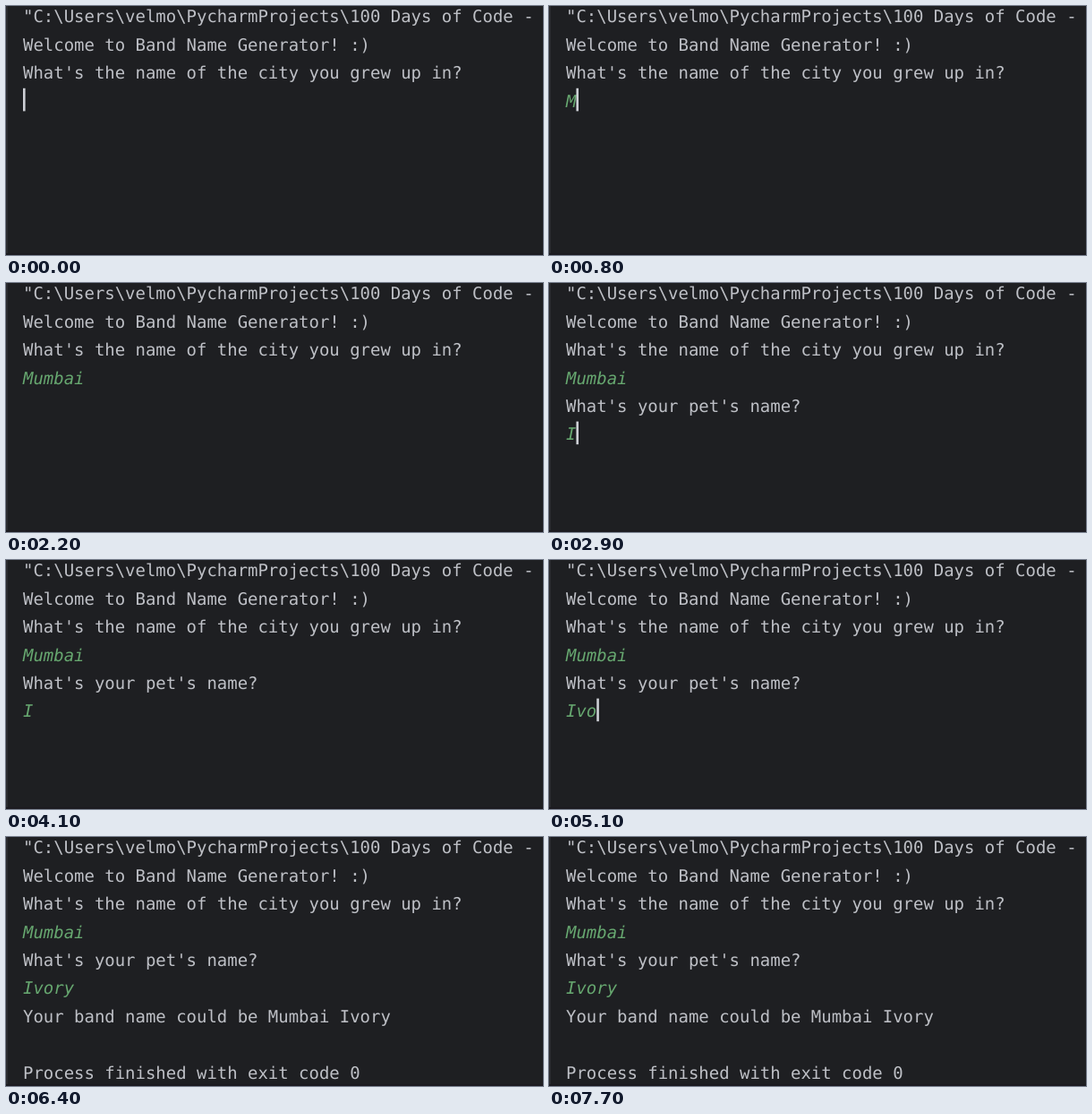
Write an HTML page that moves like this. It is 600 px wide and 278 px high and loops after 7800 ms.

```html
<!DOCTYPE html>
<html lang="en">
<head>
<meta charset="utf-8">
<title>Band name generator</title>
<style>
  html, body { margin: 0; width: 100%; height: 100%; overflow: hidden; background: #1e1f22; }
  svg { display: block; width: 600px; height: 278px; }
  text {
    font: 18.97px "DejaVu Sans Mono", "Noto Sans Mono", monospace;
    fill: #bec0c6; white-space: pre; text-rendering: geometricPrecision;
  }
  .typed { font-style: italic; fill: #67a870; }
</style>
</head>
<body>
<svg viewBox="0 0 600 278">
  <rect width="600" height="278" fill="#1e1f22"/>
  <rect width="2" height="278" fill="#2a2b2f"/>
  <rect y="276" width="600" height="2" fill="#1b1a20"/>
  <g id="lines"></g>
  <rect id="caret" width="2.6" height="25.6" fill="#ced0d6"/>
</svg>
<script>
const LOOP = 7800, LEFT = 19, ADVANCE = 11.42, FIRST = 18.4, PITCH = 31.4;
const CITY = "Mumbai", PET = "Ivory";

// Each row: text, time it is printed, or key times when typed
const rows = [
  { text: '"C:\\Users\\velmo\\PycharmProjects\\100 Days of Code -', at: 0 },
  { text: "Welcome to Band Name Generator! :)", at: 0 },
  { text: "What's the name of the city you grew up in?", at: 0 },
  { text: CITY, keys: [800, 900, 1000, 1100, 1400, 1500] },
  { text: "What's your pet's name?", at: 2300 },
  { text: PET, keys: [2800, 5000, 5100, 5200, 5300] },
  { text: `Your band name could be ${CITY} ${PET}`, at: 5400 },
  { text: "", at: 0 },
  { text: "Process finished with exit code 0", at: 5900 }
];

// Spans when the caret shows: start, end, row
const caretSpans = [
  [0, 300, 3], [800, 1500, 3],
  [2600, 3100, 5], [3600, 4100, 5], [4600, 5400, 5],
  [5400, 5900, 7]
];

const baseline = row => FIRST + PITCH * row;
const group = document.getElementById("lines");
const caret = document.getElementById("caret");

const nodes = rows.map((row, i) => {
  const node = document.createElementNS("http://www.w3.org/2000/svg", "text");
  node.setAttribute("x", LEFT);
  node.setAttribute("y", baseline(i));
  if (row.keys) node.setAttribute("class", "typed");
  return group.appendChild(node);
});

function shownText(row, t) {
  if (row.keys) return row.text.slice(0, row.keys.filter(k => k <= t).length);
  return t >= row.at ? row.text : "";
}

function draw(t) {
  rows.forEach((row, i) => {
    const text = shownText(row, t);
    if (nodes[i].textContent !== text) nodes[i].textContent = text;
  });
  const span = caretSpans.find(([from, to]) => t >= from && t < to);
  caret.style.display = span ? "" : "none";
  if (!span) return;
  const row = span[2];
  caret.setAttribute("x", LEFT + shownText(rows[row], t).length * ADVANCE);
  caret.setAttribute("y", baseline(row) - 20.8);
}

const start = performance.now();
function tick() {
  draw((performance.now() - start) % LOOP);
  requestAnimationFrame(tick);
}
tick();
</script>
</body>
</html>
```
